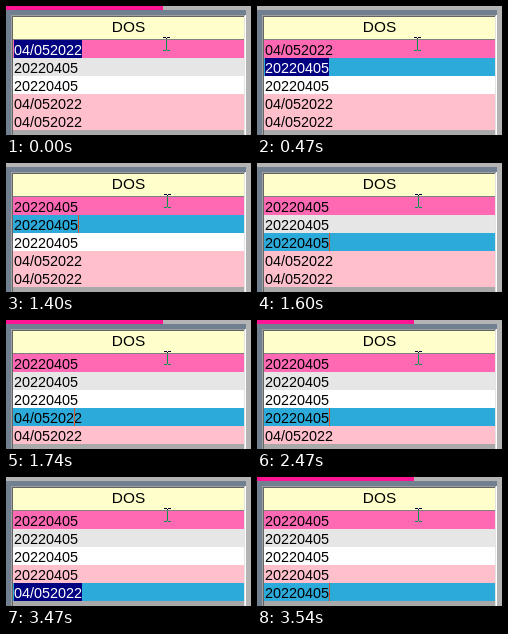
An HTML page with a canvas for the animation above (4140 ms loop, 245 by 129 pixels).

```html
<!DOCTYPE html>
<html lang="en">
<head>
<meta charset="utf-8">
<title>DOS column</title>
<style>
  html, body { margin: 0; width: 100%; height: 100%; overflow: hidden; background: #708090; }
  canvas { display: block; }
</style>
</head>
<body>
<canvas id="stage" width="245" height="129"></canvas>
<script>
const ctx = document.getElementById('stage').getContext('2d');
const LOOP = 4140, LEFT = 7, RIGHT = 238, TOP = 34, ROW = 18, TEXT_X = 8;
const FONT = '"Liberation Sans", Arial, sans-serif';
const FOCUS = '#2cabdb';

// fixedAt: the time at which the row's date gets its new form
const rows = [
  { color: '#ff69b4', fixedAt: 540 },
  { color: '#e6e6e6', fixedAt: 0 },
  { color: '#ffffff', fixedAt: 0 },
  { color: '#ffc0cb', fixedAt: 2470 },
  { color: '#ffc0cb', fixedAt: 3540 }
];

// caret: x position, 0 for hidden; select: whole cell text is marked
const steps = [
  { at: 0, row: 0, select: true, bar: true },
  { at: 470, row: 1, select: true },
  { at: 540, row: 0, caret: 72, bar: true },
  { at: 1070, row: 0, caret: 0, bar: true },
  { at: 1400, row: 1, caret: 72 },
  { at: 1600, row: 2, caret: 72 },
  { at: 1740, row: 3, caret: 68, bar: true },
  { at: 2340, row: 3, select: true, bar: true },
  { at: 2470, row: 3, caret: 72, bar: true },
  { at: 3000, row: 4, caret: 68, bar: true },
  { at: 3470, row: 4, select: true },
  { at: 3540, row: 4, caret: 72, bar: true }
];

function box(color, x, y, w, h) {
  ctx.fillStyle = color;
  ctx.fillRect(x, y, w, h);
}

function invert(x, y, w, h) {
  ctx.globalCompositeOperation = 'difference';
  box('#fff', x, y, w, h);
  ctx.globalCompositeOperation = 'source-over';
}

function label(text, x, y, color, size, align = 'left') {
  ctx.font = `${size}px ${FONT}`;
  ctx.textAlign = align;
  ctx.fillStyle = color;
  ctx.fillText(text, x, y);
}

function drawFrame(bar) {
  box('#b4b4b4', 0, 0, 245, 129);
  if (bar) box('#ff1493', 0, 0, 157, 4);
  box('#708090', 0, 4, 240, 125);
  // sunken 3D border
  box('#ffffff', 5, 9, 235, 120);
  box('#a0a0a0', 5, 9, 234, 120);
  box('#e3e3e3', 6, 10, 233, 119);
  box('#646464', 6, 10, 232, 119);
  box('#a9a9a9', LEFT, 11, RIGHT - LEFT, 118);
  box('#ffffcc', LEFT, 11, RIGHT - LEFT, 22);
  box('#808080', LEFT, 33, RIGHT - LEFT, 1);
  label('DOS', 122.5, 26, '#000', 15.4, 'center');
}

function drawRow(row, i, t, step) {
  const y = TOP + i * ROW;
  const active = step.row === i;
  const selected = active && step.select;
  const fixed = t >= row.fixedAt;
  box(active && i > 0 ? FOCUS : row.color, LEFT, y, RIGHT - LEFT, ROW);
  if (selected) box('#000080', TEXT_X, y, fixed ? 64 : 68, ROW);
  label(fixed ? '20220405' : '04/052022', TEXT_X, y + 15, selected ? '#fff' : '#000', 14.4);
  if (active && step.caret) invert(step.caret, y, 1, ROW);
}

function drawPointer(x) {
  for (const y of [31, 44]) {
    invert(x - 3, y, 3, 1);
    invert(x + 1, y, 3, 1);
  }
  invert(x, 32, 1, 12);
}

function draw(now) {
  const t = now % LOOP;
  const step = steps.findLast(s => s.at <= t);
  drawFrame(step.bar);
  rows.forEach((row, i) => drawRow(row, i, t, step));
  drawPointer(t < 540 ? 160 : 161);
}

const start = performance.now();
function tick() {
  draw(performance.now() - start);
  requestAnimationFrame(tick);
}
tick();
</script>
</body>
</html>
```
